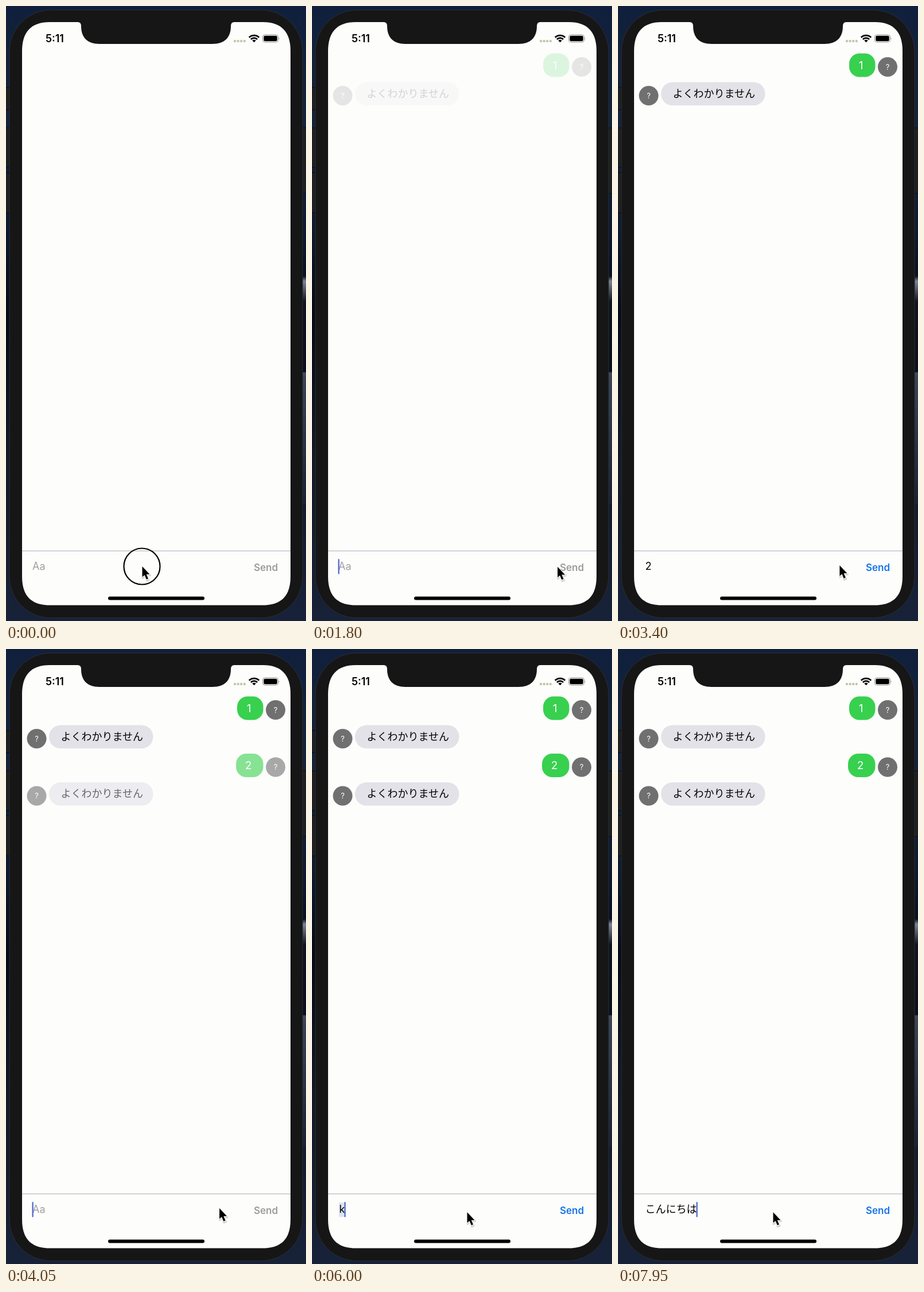
These frames come from a looping animation (523x1070 px, 8 s). An HTML page:

```html
<!DOCTYPE html>
<html lang="ja">
<head>
<meta charset="utf-8">
<title>Chat demo</title>
<style>
html, body { margin: 0; width: 100%; height: 100%; overflow: hidden; background: #0b1528; }
svg { display: block; width: 100vw; height: 100vh; }
text { font-family: Inter, "Noto Sans CJK JP", "Noto Sans CJK", sans-serif; font-size: 18px; white-space: pre; }
.mid { text-anchor: middle; }
.bold { font-weight: 600; }
</style>
</head>
<body>
<svg viewBox="0 0 523 1070" preserveAspectRatio="none">
  <defs>
    <linearGradient id="sky" x2="0" y2="1">
      <stop offset="0" stop-color="#10203c"/>
      <stop offset=".2" stop-color="#13233b"/>
      <stop offset=".36" stop-color="#0d1a31"/>
      <stop offset=".5" stop-color="#060a17"/>
      <stop offset=".72" stop-color="#131829"/>
      <stop offset="1" stop-color="#172239"/>
    </linearGradient>
    <linearGradient id="glow" x2="0" y2="1">
      <stop offset="0" stop-color="#0a1122"/>
      <stop offset=".05" stop-color="#7e8592"/>
      <stop offset=".25" stop-color="#10141f"/>
      <stop offset=".94" stop-color="#0b0f1c"/>
      <stop offset=".95" stop-color="#434a5c"/>
      <stop offset="1" stop-color="#3b4356"/>
    </linearGradient>
    <linearGradient id="fall" x2="0" y2="1">
      <stop offset="0" stop-color="#3b4356"/>
      <stop offset="1" stop-color="#1a2135"/>
    </linearGradient>
  </defs>

  <rect width="523" height="1070" fill="url(#sky)"/>
  <rect x="512" y="470" width="11" height="177" fill="url(#glow)"/>
  <rect x="512" y="647" width="11" height="220" fill="url(#fall)"/>
  <g fill="#1e1f20" stroke="#08090b">
    <rect x="-4" y="142" width="14" height="38.500" rx="2"/>
    <rect x="-4" y="212" width="14" height="69" rx="2"/>
    <rect x="-4" y="290" width="14" height="70" rx="2"/>
    <rect x="512" y="212" width="16" height="114" rx="2"/>
  </g>
  <rect x="6" y="7" width="511" height="1057.500" rx="72" fill="#161616" stroke="#2b2e32"/>
  <path fill="#fdfdfc" d="M76 28H125Q131 28 131 35C131 55 142 66 163 66H360C381 66 392 55 392 35Q392 28 398 28H448
    C480 28 496 45 496 78V993C496 1026 480 1042.500 448 1042.500H76C44 1042.500 28 1026 28 993V78C28 45 44 28 76 28Z"/>

  <text class="bold" x="69" y="63">5:11</text>
  <g id="signal" fill="#c4c6ac"></g>
  <g fill="none" stroke="#000" stroke-width="2.700">
    <path d="M423.800 54.800A12.300 12.300 0 0 1 441.200 54.800"/>
    <path d="M426.900 58A7.900 7.900 0 0 1 438.100 58"/>
    <path fill="#000" stroke="none" d="M432.500 63.300L429.300 60.100A4.500 4.500 0 0 1 435.700 60.100Z"/>
  </g>
  <rect x="447.500" y="50" width="27" height="13" rx="4" fill="none" stroke="#8e8e8e"/>
  <rect x="449.300" y="51.700" width="23.400" height="9.600" rx="2.400"/>
  <path d="M475.800 54.500Q477.600 56.500 475.800 58.500Z" fill="#8e8e8e"/>

  <g id="chat"></g>

  <path d="M28 948H496" stroke="#a8a7b5" stroke-width="1.200"/>
  <rect id="mark" x="47" y="963" height="25" fill="#dce5ed"/>
  <text id="field" y="981"></text>
  <rect id="caret" y="962" width="2.200" height="26.500" rx="1" fill="#4a63cb"/>
  <text id="send" class="bold" x="432" y="983" style="font-size:17px">Send</text>

  <g id="bar">
    <rect x="47" y="989.500" width="353" height="45.500" fill="#fdfdfc" stroke="#bdbdbd"/>
    <text id="first" class="mid" x="121" y="1018.500" style="font-size:20.500px"></text>
    <text id="second" class="mid" x="273" y="1018.500" style="font-size:20.500px"></text>
    <path d="M372.500 1015L376 1011.500L379.500 1015" fill="none" stroke="#111" stroke-width="1.500"/>
  </g>
  <rect x="178" y="1027.500" width="168" height="6" rx="3"/>

  <g id="pointer">
    <circle id="ring" r="31.500" fill="none" stroke="#000" stroke-width="2.200"/>
    <g stroke-linejoin="round">
      <path d="M1 2V20.500L5 17L8.500 25L12 23.500L8.700 15.600H14.500Z" fill="#000" opacity=".16" stroke="#000" stroke-width="3"/>
      <path d="M.5 0V18.500L4.500 15L7.800 22.600L11 21.200L7.700 13.800H13.500Z" stroke="#fff" stroke-width="2.200" paint-order="stroke"/>
    </g>
  </g>
</svg>
<script>
const LOOP = 8000, FADE = 320;
const $ = id => document.getElementById(id);

// Pointer path: time, x, y
const path = [
  [0, 237, 975], [750, 237, 975], [950, 290, 973], [1200, 401, 970], [1350, 447, 977],
  [1750, 447, 977], [1900, 390, 973], [2150, 269, 971], [2500, 269, 971], [2700, 270, 974],
  [3150, 270, 974], [3350, 365, 972], [3550, 447, 977], [3850, 447, 977], [4050, 372, 973],
  [4250, 285, 978], [4350, 270, 980], [LOOP, 270, 980]
];
const presses = [[0, 150], [1480, 1650], [3640, 3800]];

// Input states: time, text, being composed, candidates
const states = [
  [150, ""], [800, "1"], [1650, ""], [2850, "2"], [3800, ""],
  [5950, "k", true], [6150, "こ", true, "こ", "これ"], [6500, "こn", true, "こn", "この"],
  [6900, "こんn", true, "こんn", "こんな"], [7150, "こんに", true, "こんに", "こんにちは"],
  [7300, "こんにc", true, "こんにc", "こんにち"], [7400, "こんにち", true, "こんにち", "こんにちは"],
  [7550, "こんにちh", true, "こんにちh", "こんにちは"], [7650, "こんにちは", true, "こんにちは", "今日は"],
  [7850, "こんにちは"]
];

const avatar = (x, y) => `<circle cx="${x}" cy="${y}" r="17" fill="#707070"/>
  <text class="mid" x="${x}" y="${y + 4.6}" fill="#fff" style="font-size:13px">?</text>`;

const exchange = (y, text, left) => `<g>
  <rect x="${left}" y="${y}" width="${448.5 - left}" height="41" rx="18" fill="#38d04f"/>
  <text class="mid" x="${(left + 444) / 2}" y="${y + 27}" fill="#fff" style="font-size:19px">${text}</text>
  ${avatar(470, y + 23.5)}
  <rect x="75" y="${y + 50}" width="181.500" height="40.500" rx="20" fill="#e3e2e8"/>
  <text x="95.500" y="${y + 76}">よくわかりません</text>
  ${avatar(53.5, y + 73.5)}</g>`;

$("chat").innerHTML = exchange(82.5, "1", 403) + exchange(182, "2", 401);
$("signal").innerHTML = [0, 1, 2, 3].map(i => `<circle cx="${399 + i * 5.6}" cy="61" r="2.200"/>`).join("");
const rows = [[$("chat").children[0], 1720], [$("chat").children[1], 3870]];

const show = (el, on) => el.setAttribute("visibility", on ? "visible" : "hidden");
const smooth = p => { p = Math.min(1, Math.max(0, p)); return p * p * (3 - 2 * p); };

function pointerAt(t) {
  const i = path.findIndex(k => k[0] > t);
  const [a, b] = [path[i - 1], path[i]];
  const p = (t - a[0]) / (b[0] - a[0]);
  return [1, 2].map(n => a[n] + (b[n] - a[n]) * p);
}

function drawInput(t) {
  const state = states.filter(s => s[0] <= t).pop();
  const [since, text, composing, first, second] = state || [0, ""];
  const field = $("field");
  field.textContent = text || "Aa";
  field.setAttribute("x", text ? 47.5 : 46);
  field.setAttribute("fill", text ? "#000" : "#a0a0a2");
  $("send").setAttribute("fill", text ? "#1474e8" : "#9c9c9e");

  const end = text ? 47.5 + field.getComputedTextLength() : 46.5;
  $("caret").setAttribute("x", end - 1);
  show($("caret"), state && (t - since) % 1000 < 550);
  $("mark").setAttribute("width", Math.max(0, end - 47));
  show($("mark"), composing);
  show($("bar"), first);
  $("first").textContent = first || "";
  $("second").textContent = second || "";
}

function draw(t) {
  const [x, y] = pointerAt(t);
  $("pointer").setAttribute("transform", `translate(${x} ${y})`);
  show($("ring"), presses.some(([from, to]) => t >= from && t < to));
  for (const [row, start] of rows) row.setAttribute("opacity", smooth((t - start) / FADE));
  drawInput(t);
}

const origin = performance.now();
function tick() {
  draw((performance.now() - origin) % LOOP);
  requestAnimationFrame(tick);
}
tick();
</script>
</body>
</html>
```
